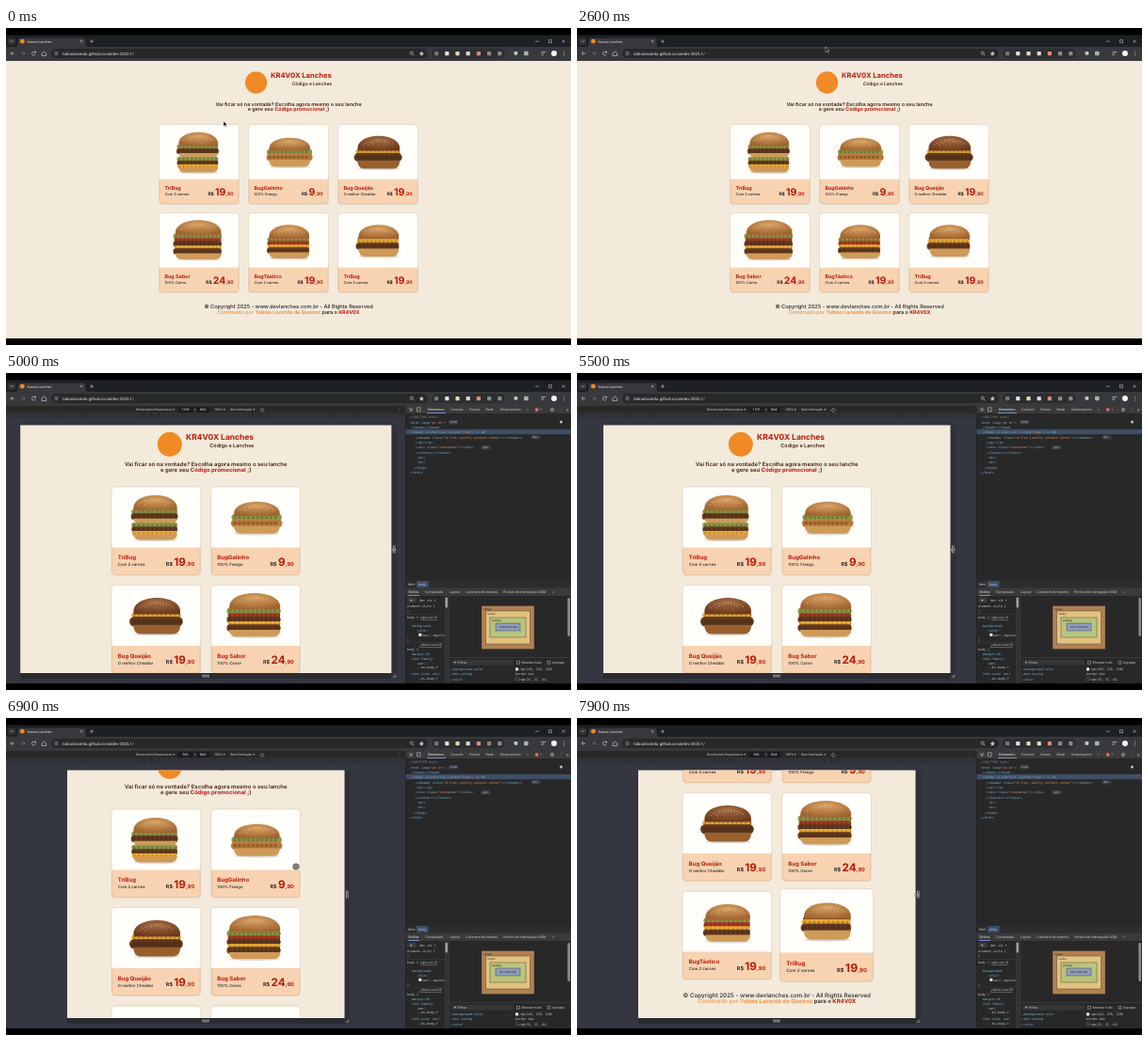
Recreate the animation shown at these times as an HTML page. Size 600x337 px, loop 8 s.

```html
<!DOCTYPE html>
<html lang="pt-br">
<head>
<meta charset="utf-8">
<title>Kravox Lanches</title>
<style>
html,body{margin:0;width:100%;height:100%;overflow:hidden;background:#000}
svg{display:block;width:100vw;height:100vh;font-family:Inter,Roboto,sans-serif;text-rendering:geometricPrecision}
text{white-space:pre}
.m{font-family:"DejaVu Sans Mono",monospace}
.r{font-family:Roboto,sans-serif}
.b{font-weight:700}
.s{font-weight:600}
.n{font-weight:500}
</style>
</head>
<body>
<svg id="stage" viewBox="0 0 600 337"></svg>
<script>
const RED = '#b81a08', BROWN = '#42200f', INK = '#24262b', ORANGE = '#f2903c';
const esc = s => s.replace(/&/g, '&amp;').replace(/</g, '&lt;');
const rect = (x, y, w, h, fill, more = '') => `<rect x="${x}" y="${y}" width="${w}" height="${h}" fill="${fill}" ${more}/>`;
const path = (d, fill, more = '') => `<path d="${d}" fill="${fill}" ${more}/>`;
const line = (d, color, w = .7) => path(d, 'none', `stroke="${color}" stroke-width="${w}"`);
const dots = (d, color, w, gap) => path(d, 'none',
  `stroke="${color}" stroke-width="${w}" stroke-linecap="round" stroke-dasharray="0 ${gap}"`);
const disc = (x, y, r, fill, more = '') => `<circle cx="${x}" cy="${y}" r="${r}" fill="${fill}" ${more}/>`;
// Text placed by the middle of its capitals; s may hold markup
const text = (x, y, s, size, fill, more = '') =>
  `<text x="${x}" y="${y + size * .36}" font-size="${size}" fill="${fill}" ${more}>${s}</text>`;
const span = (s, fill, cls = 'b') => `<tspan fill="${fill}" class="${cls}">${s}</tspan>`;
const ui = (x, y, s, fill = '#c7c8ca', size = 3.7) => text(x, y, s, size, fill, 'class="r"');
const code = (x, y, s, fill = '#7cacf8') => text(x, y,
  esc(s).replace(/"[^"]*"/g, q => `<tspan fill="#f29766">${q}</tspan>`), 3.3, fill, 'class="m"');

// name, note, price, x, width, top, dome height, layers
const ITEMS = [
  ['TriBug', 'Com 2 carnes', 19, 19, 45, 7.5, 14, 'L4P5B4L4P4C3B5'],
  ['BugGalinho', '100% Frango', 9, 20, 47, 13.5, 13, 'L5F6B7'],
  ['Bug Queijão', 'O melhor Cheddar', 19, 19, 48, 11.5, 15, 'C4P8K8'],
  ['Bug Sabor', '100% Carne', 24, 15.5, 52, 7, 15, 'L5T3P5C3P5B6'],
  ['BugTástico', 'Com 2 carnes', 19, 20, 46, 12, 14, 'L4T4C3P5B6'],
  ['TriBug', 'Com 2 carnes', 19, 20, 46, 12, 14, 'P2C4P6B8']
];
const FOOD = {L: '#8b9a49', P: '#633a1f', B: '#cf9a58', C: '#e9a935', T: '#a83a22', F: '#b87a38', K: '#98602f'};

function burger(x, w, top, dome, layers) {
  const mid = x + w / 2, y0 = top + dome, r = x + w;
  let y = y0, out = '';
  for (const [, kind, n] of layers.matchAll(/([A-Z])(\d)/g)) {
    const h = +n, c = FOOD[kind], across = `M${x + 2.5} ${y + h / 2}H${r - 2}`;
    if ('BK'.includes(kind)) {
      out += path(`M${x + 1.5} ${y - .5}H${r - 1.5}Q${r - 2} ${y + h} ${r - 8} ${y + h}H${x + 8}Q${x + 2} ${y + h} ${x + 1.5} ${y - .5}Z`, c);
    } else {
      out += rect(x + 2, y - .5, w - 4, h + 1, c) + dots(across, c, h + 1.5, 3.2) + dots(across, '#2a120840', h * .6, 4.3);
    }
    if (kind == 'C') out += path(`M${mid - 6} ${y + h}h18l-8 5z`, c);
    y += h;
  }
  const seeds = [.45, .68].map(f => dots(
    `M${mid - w * f * .5} ${y0 - dome * .35}Q${mid} ${y0 - dome * (.55 + f * .8)} ${mid + w * f * .5} ${y0 - dome * .35}`,
    '#f0d59a', .7, 3)).join('');
  return `<ellipse cx="${mid}" cy="${y}" rx="${w * .46}" ry="1.6" fill="#0002"/>` + out +
    path(`M${x + 2} ${y0 + 1}C${x - 3} ${top - dome * .33} ${r + 3} ${top - dome * .33} ${r - 2} ${y0 + 1}Z`,
      layers.includes('K') ? 'url(#dark)' : 'url(#bun)') + seeds;
}

const CARD_W = 84.5, CARD_H = 84;
const card = ([name, note, price, ...shape]) => `<g class="card">` +
  rect(0, 0, CARD_W, CARD_H, '#f8d3b2', 'rx="3.5" stroke="#5a30101c" stroke-width="1.4"') +
  path('M0 57.7V3.5Q0 0 3.5 0H81Q84.5 0 84.5 3.5V57.7Z', '#fffefa') +
  burger(...shape) +
  text(5.7, 67, name, 5.4, RED, 'class="b"') +
  text(5.7, 74, note, 3.9, INK, 'class="n"') +
  `<text x="79" y="75" text-anchor="end" class="b" fill="${RED}"><tspan font-size="4.9" fill="${INK}">R$</tspan><tspan font-size="10.5" dx="1.2">${price}</tspan><tspan font-size="5.1">,90</tspan></text></g>`;

const mid = (y, s, fill, cls = 's', size = 5.4) => text(0, y, s, size, fill, `class="${cls}" text-anchor="middle"`);
const page = `<g id="page"><g id="head">` +
  disc(-34.5, 23, 11.7, '#f08a24') +
  text(-19, 15.5, 'KR4V0X Lanches', 7.6, RED, 'class="b"') +
  text(46, 24.5, 'Código e Lanches', 4.9, BROWN, 'class="s" text-anchor="end"') +
  `</g><g id="body">` +
  mid(45.7, 'Vai ficar só na vontade? Escolha agora mesmo o seu lanche', BROWN) +
  mid(51.5, 'e gere seu ' + span('Código promocional', RED) + ' ;)', BROWN) +
  ITEMS.map(card).join('') + `<g id="foot">` +
  mid(0, '© Copyright 2025 - www.devlanches.com.br - All Rights Reserved', INK, 'n', 5.65) +
  mid(5.9, 'Construído por ' + span('Tobias Lacerda de Queiroz', ORANGE) + span(' para o ', INK, 's') + span('KR4V0X', RED), ORANGE, 'n') +
  `</g></g></g>`;

const GREY = '#c4c5c7', BAR = '#37393c';
const browser = rect(0, 7.5, 600, 27.5, '#1d2024') + rect(0, 20, 600, 15, BAR) +
  rect(2, 10.8, 8, 7, '#343538', 'rx="2"') + line('M4.8 13.4l1.4 1.4 1.4-1.4', GREY) +
  path('M10 20Q12.5 20 12.5 17V13Q12.5 10.8 15 10.8H82Q84.5 10.8 84.5 13V17Q84.5 20 87 20Z', BAR) +
  disc(17.3, 14.2, 2.4, '#f08a24') + ui(22.5, 14.2, 'Kravox Lanches', '#e8e8e8') +
  line('M79 13l2.4 2.4m0-2.4l-2.4 2.4M89 14.2h4m-2-2v4M562 14.2h4M576.5 12.7h3v3h-3zM590.5 12.7l3 3m0-3l-3 3', GREY, .6) +
  line('M9 27H5m1.7-1.8L5 27l1.7 1.8', GREY) + line('M16 27h4m-1.7-1.8L20 27l-1.7 1.8', '#777') +
  line('M31.2 26a2 2 0 1 0 0 2m.3-3.4v1.6h-1.6M38 27l2.3-2 2.3 2v2.5h-4.6z', GREY) +
  rect(48, 22, 400, 10, '#272829', 'rx="5"') + disc(53.5, 27, 3, BAR) +
  line('M52 26h3m-3 2h3', GREY, .5) + ui(60, 27, 'tobiaslacerda.github.io/unidev-2025.1/', '#e6e6e6', 4.4) +
  disc(430.7, 26.6, 1.5, 'none', `stroke="${GREY}" stroke-width=".7"`) + line('M432 28l1.3 1.3', GREY) +
  path('M441.3 24.6l.8 1.7 1.8.2-1.3 1.3.3 1.8-1.6-.9-1.6.9.3-1.8-1.3-1.3 1.8-.2z', GREY) +
  rect(452, 22, 78, 10, '#2d2e30', 'rx="5"') +
  ['#777', '#d8e5f2', '#e7d7b0', '#d8d8d8', '#e08a72', '#8a8b90', '#8a8b90'].map((c, i) =>
    rect(455 + i * 11.2, 25, 4.2, 4.2, c, 'rx=".8"')).join('') +
  rect(539.5, 25, 3.8, 3.8, GREY, 'rx="1"') +
  rect(550, 24.7, 4.6, 4.6, '#a5b6a9', 'rx="1"') + line('M568.5 25.4h5m-5 1.6h3m-3 1.6h2', GREY) +
  disc(582, 27, 3, '#f1f1f1') + [25, 27, 29].map(y => disc(592.5, y, .5, GREY)).join('');

const tag = (x, y, s) => rect(x, y - 2.1, 10, 4.2, '#3d4047', 'rx="1.6"') + ui(x + 2, y, s, '#a9c3ea', 2.8);
const box = (x, y, w, h, fill, label) => rect(x, y, w, h, fill, 'stroke="#333" stroke-width=".4"') + ui(x + 2, y + 3, label, '#222', 2.8);
const tree = [
  [429, '<!DOCTYPE html>'], [429, '<html lang="pt-br">'], [431, '▸<head>⋯</head>'],
  [431, '▾<body cz-shortcut-listen="true"> == $0'],
  [435, '▸<header class="d-flex justify-content-center">⋯</header>'], [435, '▸<p>⋯</p>'],
  [435, '▸<div class="container">⋯</div>'], [435, '▸<footer>⋯</footer>'],
  [437, '<br>'], [437, '<br>'], [433, '</body>'], [429, '</html>']
];
const css = [
  [426, 248, 'element.style {'], [426, 253, '}'], [426, 260, 'body {'], [431, 269, 'background-'], [437, 274, 'color:'],
  [442, 278.5, 'var(--bgcolo'], [426, 284, '}'], [426, 294, 'body {'], [431, 299, 'margin:▸0;'], [431, 304, 'font-family:'],
  [437, 308.5, 'var('], [437, 313, '--bs-body-f'], [431, 320, 'font-size: var('], [437, 325, '--bs-body-f']
];
const tabs = (y, list) => list.map(([x, s], i) => ui(x, y, s, i ? GREY : '#eee')).join('');
const panel = rect(424.5, 35, 175.5, 295, '#282829') + rect(424.5, 35, 175.5, 8, '#3a3a3b') +
  line('M428 37l3 3m0-3v3h-3M436.5 36.8h3.6v4h-3.6z', GREY, .6) +
  tabs(39, [[448, 'Elementos'], [472, 'Console'], [492, 'Fontes'], [509.5, 'Rede'], [525, 'Desempenho'], [553, '»'], [567, '1']]) +
  rect(447, 42.2, 20, .8, '#7cacf8') + rect(562, 37.3, 3.4, 3.4, '#e46962', 'rx="1"') +
  disc(580, 39, 1.5, 'none', `stroke="${GREY}" stroke-width=".8"`) + ui(588, 39, '⋮') + ui(595, 39, '×', GREY, 5) +
  rect(424.5, 59.8, 175.5, 5.4, '#3e4f66') +
  tree.map(([x, s], i) => code(x, 47 + i * 5.36, s, i ? '#7cb8dc' : '#8a8b8d')).join('') +
  tag(470, 52.2, 'scroll') + tag(557.5, 68.3, 'flex') + tag(504.5, 79.2, 'grid') +
  disc(589.5, 52, 1.5, '#bfc0c2') +
  rect(424.5, 220.5, 175.5, 8, '#2d2d2f') + rect(436, 221, 12.5, 7, '#3e4f66') + ui(427, 224.7, 'html') + ui(438, 224.7, 'body', '#a8c7fa') +
  rect(424.5, 228.5, 175.5, 8.5, '#3a3a3b') +
  tabs(233, [[427.5, 'Estilos'], [445, 'Computado'], [471, 'Layout'], [488.5, 'Listeners de eventos'], [528, 'Pontos de interrupção DOM'], [580, '»']]) +
  rect(427, 236.2, 12, .8, '#7cacf8') +
  rect(426, 238.5, 10, 5.5, '#3b3c3e', 'rx="2"') + ui(428.5, 241.2, '▼') + ui(439, 241.2, 'dev  .cls  +') +
  css.map(([x, y, s]) => code(x, y, s, /:/.test(s) || /^back/.test(s) ? '#7cc5dc' : '#d0d1d3')).join('') +
  rect(438.3, 276.8, 3, 3, '#f5ebdc') +
  ui(440, 260, '<tspan text-decoration="underline">style.css:18</tspan>', GREY, 3.4) +
  ui(439, 289, '<tspan text-decoration="underline">_reboot.scss:50</tspan>', GREY, 3.4) +
  line('M424.5 256.5h45M424.5 286.5h45', '#47484b', .4) +
  rect(466, 238, 3.5, 92, '#333436') + rect(466.5, 238.5, 2.5, 11, '#a0a1a3', 'rx="1.2"') +
  rect(596.4, 239, 2.6, 41, '#8b8c8f', 'rx="1.2"') +
  line('M470.5 237v93M470.5 302.5h129.5', '#4b4c4f', .5) +
  box(505, 247.5, 56, 46, '#b18152', 'margin') + box(509.5, 253, 47, 35, '#e2c27e', 'border') +
  box(514, 260, 38, 21, '#b9c47d', 'padding') + rect(520, 266, 26, 8, '#8f9dbd', 'stroke="#333" stroke-width=".4"') +
  text(533, 270, '', 2.8, '#222', 'id="dims" class="r" text-anchor="middle"') +
  rect(473, 305, 66, 5.5, '#353638', 'rx="2"') + ui(475, 307.8, '▼ Filtrar') +
  line('M542.5 306.3h3v3h-3zM575 306.3h3v3h-3z', GREY, .5) + ui(547.5, 307.8, 'Mostrar tudo') + ui(580, 307.8, 'Agrupar') +
  code(473, 315, '▸background-color', '#7cc5dc') + code(473, 320.2, '▸box-sizing', '#7cc5dc') + code(473, 325.4, '▸color', '#7cc5dc') +
  rect(541, 313.4, 3, 3, '#f5ebdc') + code(545, 315, 'rgb(245, 235, 220)', '#d0d1d3') + code(541, 320.2, 'border-box', '#d0d1d3') +
  rect(541, 323.9, 3, 3, '#212529', 'stroke="#999" stroke-width=".3"') + code(545, 325.4, 'rgb(33, 37, 41)', '#d0d1d3');

const device = rect(0, 35, 424.5, 295, '#343640') + rect(0, 35, 424.5, 7.5, '#282829') +
  ui(138, 39, 'Dimensões Responsivo ▾', GREY) +
  rect(182.5, 36, 16, 6, '#1b1c1e', 'rx="1"') + rect(202.5, 36, 14, 6, '#1b1c1e', 'rx="1"') +
  text(190.5, 39, '', 3.7, '#eee', 'id="wide" class="r" text-anchor="middle"') +
  ui(199.8, 39, '×') + ui(206, 39, '844', '#eee') + ui(221, 39, '100% ▾') + ui(238, 39, 'Sem limitação ▾') +
  line('M270 39.5l2-2 2 2-2 2z', GREY, .6) + ui(416, 39, '⋮') +
  rect(0, 42.5, 424.5, 5.2, '#303238') +
  [50, 58, 66, 131, 159].map(d => line(`M${212.2 - d} 42.5v5.2M${212.2 + d} 42.5v5.2`, '#202126', .8)).join('') +
  rect(0, 319, 0, 6, '#2a2c32', 'id="below"') + rect(0, 55.5, 6, 269.5, '#2f3138', 'id="side"') +
  line('M208 321.3h8m-8 1.6h8', GREY, .7) +
  `<g id="grip">${line('M-.8 183.5v8m1.6-8v8M-1.5 324l3.5-3.5M.5 324l1.5-1.5', GREY, .7)}</g>`;

const CURSORS = {
  arrow: path('M0 0V5.6L1.3 4.4 2.2 6.3 3.2 5.9 2.3 4H4Z', '#111', 'stroke="#fff" stroke-width=".4"'),
  hand: path('M-.6-2.5Q0-3.2.6-2.5V0L3 .6V3L2 5H-1L-2.8 1.6-2 1-.6 2Z', '#fff', 'stroke="#111" stroke-width=".5"'),
  dot: disc(0, 0, 3.3, '#66615ccc', 'stroke="#4b4845" stroke-width=".5"'),
  size: path('M-2.8 0l1.5-1.5v1h2.6v-1l1.5 1.5-1.5 1.5v-1h-2.6v1z', '#d0d0d0', 'stroke="#222" stroke-width=".3"')
};

const stage = document.getElementById('stage');
stage.innerHTML = `<defs>
<radialGradient id="bun" cy=".3" r=".7"><stop stop-color="#d6a062"/><stop offset="1" stop-color="#a0642f"/></radialGradient>
<radialGradient id="dark" cy=".3" r=".7"><stop stop-color="#a56c42"/><stop offset="1" stop-color="#6b3a1e"/></radialGradient>
<clipPath id="clip">${rect(0, 35, 600, 295, '#000', 'id="view"')}</clipPath></defs>` +
  rect(0, 0, 600, 337, '#000') + browser + `<g id="tools">${device + panel}</g>` +
  `<g clip-path="url(#clip)">${rect(0, 35, 600, 295, '#f3eadb')}${page}</g>` +
  `<g id="cursor">${Object.entries(CURSORS).map(([k, s]) => `<g id="${k}">${s}</g>`).join('')}</g>`;

const $ = id => document.getElementById(id);
const cards = [...document.querySelectorAll('.card')];
const set = (el, o) => { for (const k in o) el.setAttribute(k, o[k]); };
const move = (el, x, y, k = 1) => el.setAttribute('transform', `translate(${x} ${y}) scale(${k})`);

// Smooth interpolation through [time, ...values] keys
function at(keys, t) {
  const i = keys.findIndex(k => k[0] > t);
  if (i < 0) return keys.at(-1).slice(1);
  if (!i) return keys[0].slice(1);
  const a = keys[i - 1], b = keys[i], u = (t - a[0]) / (b[0] - a[0]), e = u * u * (3 - 2 * u);
  return a.slice(1).map((v, j) => v + (b[j + 1] - v) * e);
}
const POINTER = [
  [0, 231, 99], [400, 205, 145], [900, 300, 150], [1400, 406, 154], [1700, 400, 245], [2000, 300, 245], [2300, 215, 230],
  [2600, 264, 20], [3000, 330, 150], [3400, 318, 268], [3800, 372, 115], [4600, 421, 188], [5500, 399, 188],
  [6300, 362, 188], [6700, 310, 165], [6900, 308, 158], [7300, 300, 190], [7600, 266, 230], [7900, 361, 188]
];
const SIZE = [[4600, 6, 1217], [5500, 28, 1101], [6300, 65, 943]];
const SCROLL = [[6700, 0], [6900, 24], [7300, 146]];
const OPEN = 2700;

function draw(t) {
  const tools = t >= OPEN, [px, py] = at(POINTER, t), [left, wide] = at(SIZE, t), [scroll] = at(SCROLL, t);
  const right = 424.5 - left, cols = tools && wide < 1200 ? 2 : 3, rows = 6 / cols;
  $('tools').style.display = tools ? '' : 'none';
  set($('view'), tools ? {x: left, y: 55.5, width: right - left, height: 263.5} : {x: 0, y: 35, width: 600, height: 295});
  if (tools) move($('page'), 212.2, 55.5 - scroll, 1.112);
  else move($('page'), 300, 35);
  move($('head'), 0, tools ? -4.7 : 0);
  move($('body'), 0, tools ? -8.8 : 0);
  move($('foot'), 0, 68 + 94 * (rows - 1) + CARD_H + 15);

  let over = false;
  cards.forEach((el, i) => {
    const x = (i % cols) * 95 - (95 * cols - 10.5) / 2, y = 68 + 94 * Math.floor(i / cols);
    const dx = px - 300 - x, dy = py - 35 - y;
    const hot = tools ? i == 5 && (t >= 3300 && t < 4400 || t >= 7500)
      : dx > 0 && dx < CARD_W && dy > 0 && dy < CARD_H;
    over ||= hot;
    const k = hot ? 1.05 : 1;
    move(el, x - CARD_W * (k - 1) / 2, y - CARD_H * (k - 1) / 2, k);
  });

  set($('below'), {x: left, width: right - left});
  set($('side'), {x: right});
  move($('grip'), right + 2.8, 0);
  $('wide').textContent = Math.round(wide);
  $('dims').textContent = Math.round(wide) + '×' + (cols == 3 ? '850.500' : '1032.500');

  const kind = !tools ? (over ? 'hand' : 'arrow')
    : px > right - 1 ? 'size' : py < 55 ? 'arrow' : 'dot';
  for (const k in CURSORS) $(k).style.display = k == kind ? '' : 'none';
  move($('cursor'), px, py);
}

function loop() {
  draw(Math.floor(performance.now() % 8000 / 100) * 100);
  requestAnimationFrame(loop);
}
loop();
</script>
</body>
</html>
```
